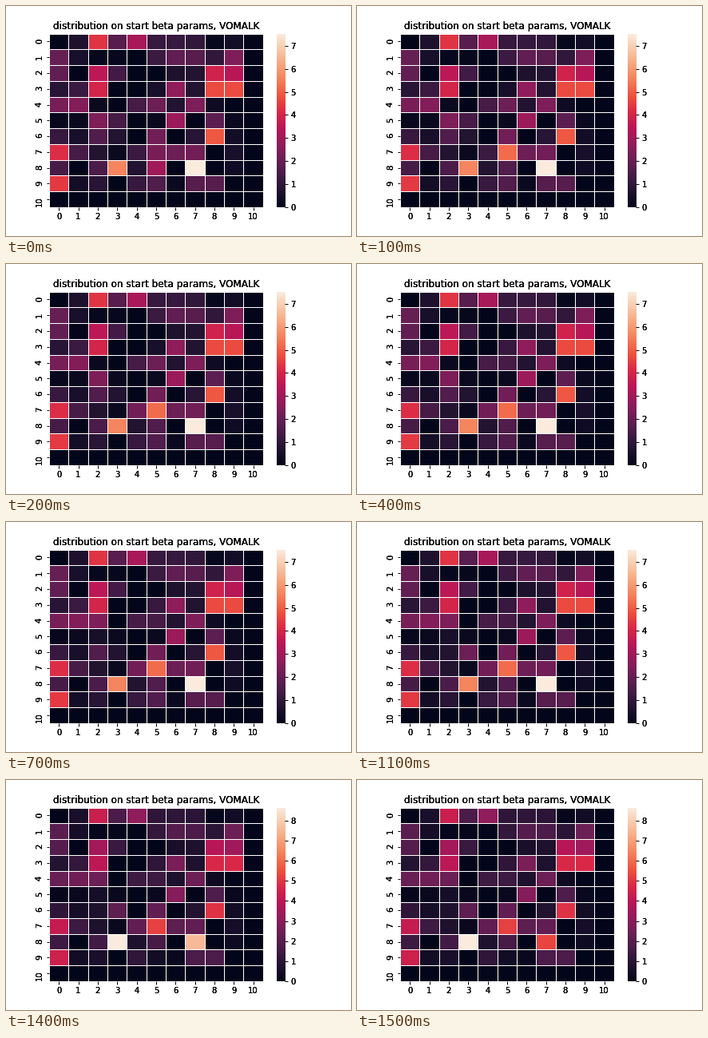
A matplotlib script for the animation above (6.2 s loop, 432x288 px).

```python
import matplotlib.pyplot as plt
import numpy as np
from matplotlib.animation import FuncAnimation
from matplotlib.colors import LinearSegmentedColormap

W, H, DPI = 432, 288, 72
STEP, FRAMES = 100, 62
N = 11

plt.rcParams["font.family"] = "DejaVu Sans"

CMAP = LinearSegmentedColormap.from_list("ember", [
    "#03051a", "#221331", "#451c47", "#691f55", "#921c5b", "#b91657",
    "#d92847", "#ed503e", "#f47d57", "#f6a47c", "#f7c9aa", "#faebdd"])

# The last row and column stay empty.
START = np.zeros((N, N))
START[:10, :10] = [
    [0, .6, 4.3, 1.7, 3.1, 1.1, 1.1, 1, .1, .4],
    [2, .5, .1, .1, 0, 1.2, 1.9, 1.7, 1, 2.4],
    [1.9, 0, 3.5, 1.3, 0, 0, .6, .7, 3.9, 3.4],
    [.8, 1.2, 4.0, 0, 0, .5, 2.7, .7, 4.7, 4.7],
    [2.3, 2.5, .2, 0, 1.4, 2.1, .7, 2.4, .3, 0],
    [.1, .2, 2.4, 1.4, 0, .2, 2.9, 0, 1.8, .2],
    [1.1, .5, 1.6, .7, 0, 2.2, 0, .8, 4.9, .4],
    [4.2, 1.4, .7, .2, 1.2, 2.3, 2.1, 2.2, 0, .5],
    [1.4, 0, 1.5, 5.6, .7, 3, 0, 7.53, 0, .3],
    [4.4, .4, .8, 0, 1.1, 1.6, .2, 1.7, 1.7, 0]]

# time in ms -> (row, column, new value)
MOVES = {
    100: [(8, 5, 1.6), (7, 5, 5.2)],
    200: [(5, 3, .2), (7, 4, 2.2)],
    400: [(4, 5, 1.4), (3, 5, 1.1)],
    700: [(5, 2, .5), (4, 2, 2.4)],
    1100: [(6, 2, .7), (6, 3, 2.1)],
    1400: [(8, 3, 8.65), (9, 5, .4), (9, 2, .6)],
    1500: [(8, 7, 5.3)],
}


def grid_at(ms):
    grid = START.copy()
    for t, cells in MOVES.items():
        if ms >= t:
            for r, c, v in cells:
                grid[r, c] = v
    return grid


def heavy(ax, s, xy, coords, shift, size=10, **kw):
    """Stack copies of a label so its soft edges turn solid."""
    return [ax.annotate(s, xy, xytext=shift, xycoords=coords,
                        textcoords="offset points", fontsize=size, **kw)
            for _ in range(3)]


def add_axes(x, width):
    ax = fig.add_axes([x / W, .125, width / W, .755])
    for spine in ax.spines.values():
        spine.set_visible(False)
    ax.tick_params(length=3.5, width=1, labelleft=False, labelbottom=False,
                   labelright=False)
    return ax


fig = plt.figure(figsize=(W / DPI, H / DPI), dpi=DPI, facecolor="white")

ax = add_axes(54, 267.84)
mesh = ax.pcolormesh(START, cmap=CMAP, edgecolors="white", linewidth=1)
ax.set(xlim=(0, N), ylim=(N, 0),
       xticks=np.arange(N) + .5, yticks=np.arange(N) + .5)
for k in range(N):
    heavy(ax, str(k), (k + .5, 0), ("data", "axes fraction"), (0, -7),
          ha="center", va="top")
    heavy(ax, str(k), (0, k + .5), ("axes fraction", "data"), (-7, 0),
          ha="right", va="center_baseline", rotation=90)
heavy(ax, "distribution on start beta params, VOMALK", (.5, 1),
      "axes fraction", (0, 6), size=12, ha="center", va="baseline")

bar = add_axes(338.58, 10.87)
ramp = bar.imshow(np.linspace(0, 1, 256)[:, None], cmap=CMAP, origin="lower",
                  aspect="auto", extent=(0, 1, 0, 1))
bar.set_xticks([])
bar.yaxis.tick_right()
bar.tick_params(labelright=False)
bar_labels = [heavy(bar, str(k), (1, k), ("axes fraction", "data"), (7, 0),
                    ha="left", va="center_baseline") for k in range(9)]


def update(i):
    grid = grid_at(i * STEP)
    top = grid.max()
    mesh.set_array(grid)
    mesh.set_clim(0, top)
    ramp.set_extent((0, 1, 0, top))
    bar.set_yticks(range(int(top) + 1))
    bar.set_ylim(0, top)
    for k, copies in enumerate(bar_labels):
        for label in copies:
            label.set_visible(k <= top)
    return []


anim = FuncAnimation(fig, update, frames=FRAMES, interval=STEP,
                     init_func=lambda: update(0), repeat=True, repeat_delay=0)
plt.show()
```
